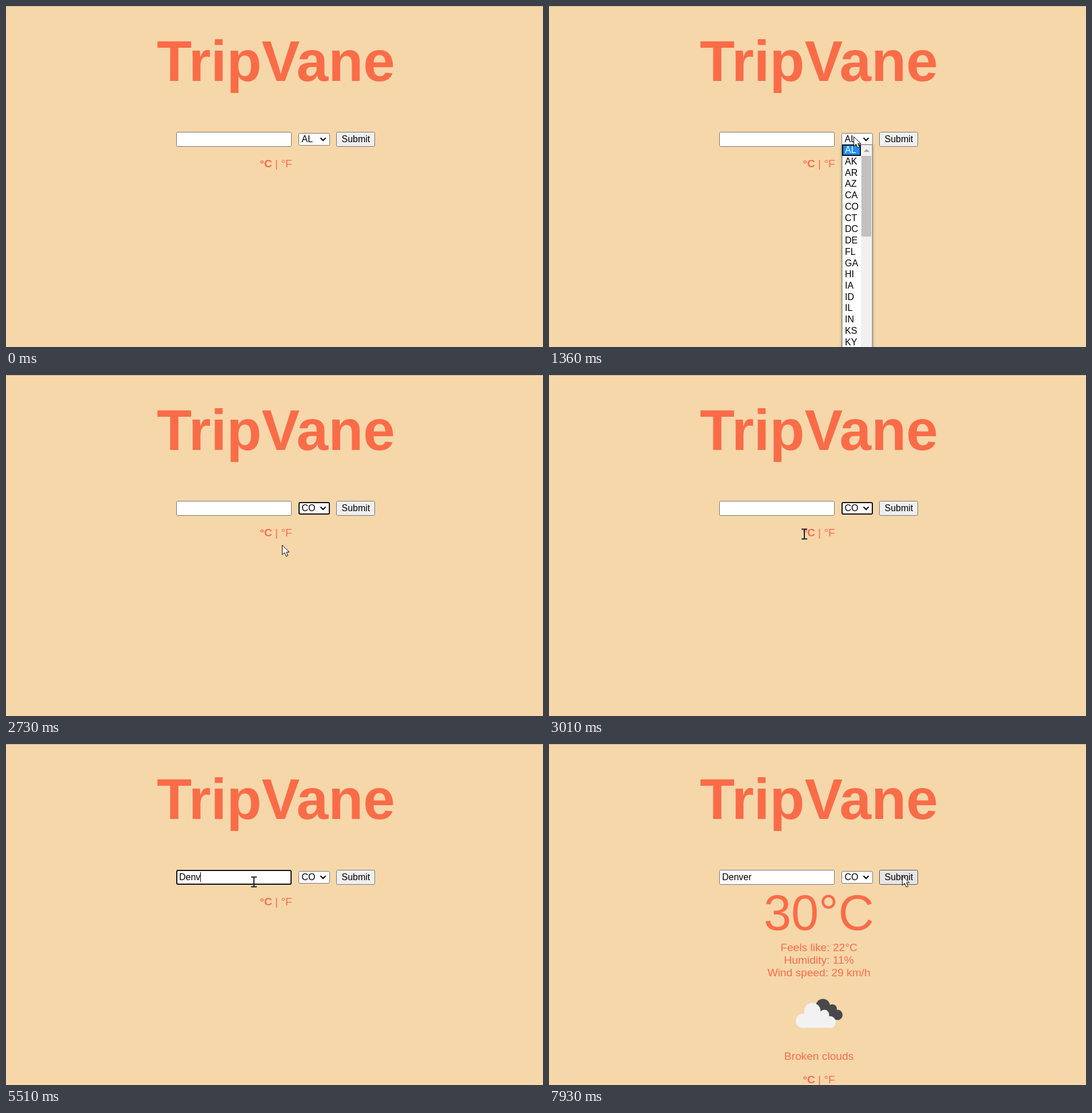
These frames come from a looping animation (940x596 px, 8000 ms). An HTML page:

```html
<!DOCTYPE html>
<html lang="en">
<head>
<meta charset="utf-8">
<title>TripVane</title>
<style>
  html, body { margin: 0; width: 100%; height: 100%; overflow: hidden; background: #f6d7aa; }
  svg { display: block; font: 16px "Liberation Sans", Arial, sans-serif; }
  .coral { fill: #fa6c48; font-size: 19.2px; text-anchor: middle; }
  .coral .title { font-size: 100px; font-weight: bold; }
  .coral .temp { font-size: 86.4px; }
  .box { fill: #fff; stroke: #767676; }
  .hover { stroke: #4f4f4f; }
  .focus { stroke: #101010; stroke-width: 2; }
  /* Focus rings grow inwards and stay on whole pixels */
  #input.focus { x: 299px; y: 221px; width: 200px; height: 24px; }
  #select.focus { x: 513px; y: 223px; width: 53px; height: 20px; }
  #button { fill: #efefef; }
  #button.hover { fill: #e5e5e5; }
  #button.pressed { fill: #f5f5f5; stroke: #8d8d8d; }
  #popup { filter: drop-shadow(0 1px 2px #0006); }
</style>
</head>
<body>
<svg width="940" height="596" viewBox="0 0 940 596">
  <rect width="940" height="1" fill="#cfb08d"/>
  <g class="coral">
    <text class="title" x="472.5" y="131">TripVane</text>
    <text id="units" x="472.5"><tspan font-weight="bold">°C</tspan> | °F</text>
  </g>

  <rect id="input" class="box" x="298.5" y="220.5" width="201" height="25" rx="2"/>
  <text id="typed" x="303" y="238"></text>
  <rect id="caret" y="224" width="1" height="17"/>

  <rect id="select" class="box" x="512.5" y="222.5" width="54" height="21" rx="2"/>
  <text id="state" x="517.5" y="238"></text>
  <path d="M550.5 230.5l4.5 4.500 4.500-4.500" fill="none" stroke="#000" stroke-width="2"/>

  <rect id="button" class="box" x="578.5" y="220.5" width="67" height="25" rx="2"/>
  <text x="587.5" y="238">Submit</text>

  <g id="result">
    <g class="coral">
      <text class="temp" x="472.5" y="325">30°C</text>
      <text x="472.5" y="362">Feels like: 22°C</text>
      <text x="472.5" y="384">Humidity: 11%</text>
      <text x="472.5" y="406">Wind speed: 29 km/h</text>
      <text x="472.5" y="552">Broken clouds</text>
    </g>
    <g fill="#48484a">
      <circle cx="479.5" cy="458" r="12.5"/>
      <circle cx="496" cy="463" r="8"/>
      <circle cx="505" cy="473.5" r="9"/>
      <path d="M474 462h24l7 20h-20z"/>
    </g>
    <g fill="#f2f2f2">
      <circle cx="461" cy="467" r="14.5"/>
      <circle cx="482" cy="473" r="8.5"/>
      <circle cx="444.5" cy="484" r="12.5"/>
      <circle cx="491.5" cy="486" r="10.5"/>
      <path d="M444 496V478l12-10 26 2 9 10v16z"/>
    </g>
  </g>

  <g id="popup">
    <rect x="513" y="242.5" width="53" height="370" fill="#fff" stroke="#707070"/>
    <rect x="546" y="243" width="19" height="353" fill="#f1f1f1"/>
    <rect x="547" y="262" width="17" height="141" fill="#c1c1c1"/>
    <path d="M551 255l5-5 5 5z" fill="#a3a3a3"/>
    <rect id="mark" x="514" width="31" height="18" fill="#1e90ff" stroke="#101010" stroke-width="2"/>
    <g id="options"></g>
  </g>

  <path id="arrow" d="M.5.5V17l4-3.500L7.500 20l3-1.300L7.700 12.500H13z" fill="#fff" stroke="#000"/>
  <path id="beam" d="M-5-8.500H5M0-8.500V8.500M-5 8.500H5" fill="none" stroke="#182036" stroke-width="2"/>
</svg>
<script>
const $ = id => document.getElementById(id);
const LOOP = 8000, ROW = 19.72, LIST_TOP = 242;
const OPEN = 1040, CHOOSE = 2300, FOCUS = 3810, PRESS = 6690, RELEASE = 6780, LOADED = 7160;
const KEYS = [4360, 5250, 5380, 5510, 5690, 5740];

// Eased pointer moves: start, end, then the points of a Bézier curve
const moves = [
  [220, 930, [730, 524], [342, 145], [533, 228]],
  [1360, 1930, [533, 228], [526, 395], [538, 347]],
  [2300, 3020, [538, 347], [500, 300], [447, 278]],
  [3090, 3750, [447, 278], [435, 298], [434, 241]],
  [5990, 6560, [434, 241], [480, 290], [590, 165], [623, 229]],
  [7650, 7930, [623, 229], [621, 222], [618, 230]]
];

const options = "AL AK AR AZ CA CO CT DC DE FL GA HI IA ID IL IN KS KY".split(" ").map((name, i) => {
  const el = document.createElementNS("http://www.w3.org/2000/svg", "text");
  el.textContent = name;
  el.setAttribute("x", 518);
  el.setAttribute("y", 257.3 + i * ROW);
  $("options").append(el);
  return el;
});

const show = (id, on) => $(id).style.display = on ? "" : "none";
const flag = (id, name, on) => $(id).classList.toggle(name, on);
const place = (id, x, y) => $(id).setAttribute("transform", `translate(${x} ${y})`);
const smooth = k => k * k * (3 - 2 * k);
const mix = (a, b, k) => a.map((v, i) => v + (b[i] - v) * k);

function bezier(points, k) {
  if (points.length === 1) return points[0];
  return bezier(points.slice(1).map((p, i) => mix(points[i], p, k)), k);
}

function pointer(t) {
  const [start, end, ...points] = moves.findLast(m => m[0] <= t) || moves[0];
  const k = Math.min(1, Math.max(0, (t - start) / (end - start)));
  return bezier(points, smooth(k)).map(Math.round);
}

function draw(t) {
  const [x, y] = pointer(t);
  const visible = t >= moves[0][0];
  const over = (l, top, r, b) => visible && x >= l && x <= r && y >= top && y <= b;
  const open = t >= OPEN && t < CHOOSE;
  const focused = t >= FOCUS && t < PRESS;

  const onInput = over(298, 220, 500, 246);
  const onText = t < LOADED && over(440, 265, 501, 287);
  const beam = onInput || onText;
  show("beam", beam);
  show("arrow", visible && !beam);
  place(beam ? "beam" : "arrow", x, y);

  flag("input", "hover", onInput);
  flag("input", "focus", focused);
  flag("select", "hover", !open && over(512, 222, 567, 244));
  flag("select", "focus", t >= CHOOSE && t < FOCUS);
  flag("button", "hover", over(578, 220, 646, 246));
  flag("button", "pressed", t >= PRESS && t < RELEASE);
  $("state").textContent = t < CHOOSE ? "AL" : "CO";

  show("popup", open);
  $("popup").style.opacity = Math.min(1, 0.4 + (t - OPEN) / 200);
  const row = Math.max(0, Math.floor((y - LIST_TOP) / ROW));
  $("mark").setAttribute("y", Math.round(LIST_TOP + 1 + row * ROW));
  options.forEach((el, i) => el.setAttribute("fill", i === row ? "#fff" : "#000"));

  // The caret blinks from the last click or key press
  const count = KEYS.filter(k => k <= t).length;
  const since = t - (count ? KEYS[count - 1] : FOCUS);
  $("typed").textContent = "Denver".slice(0, count);
  $("caret").setAttribute("x", Math.floor(303 + (count ? $("typed").getComputedTextLength() : 0)));
  show("caret", focused && since % 1000 < 530);

  show("result", t >= LOADED);
  $("units").setAttribute("y", t < LOADED ? 282 : 593);
}

function tick() {
  draw(performance.now() % LOOP);
  requestAnimationFrame(tick);
}
tick();
</script>
</body>
</html>
```
